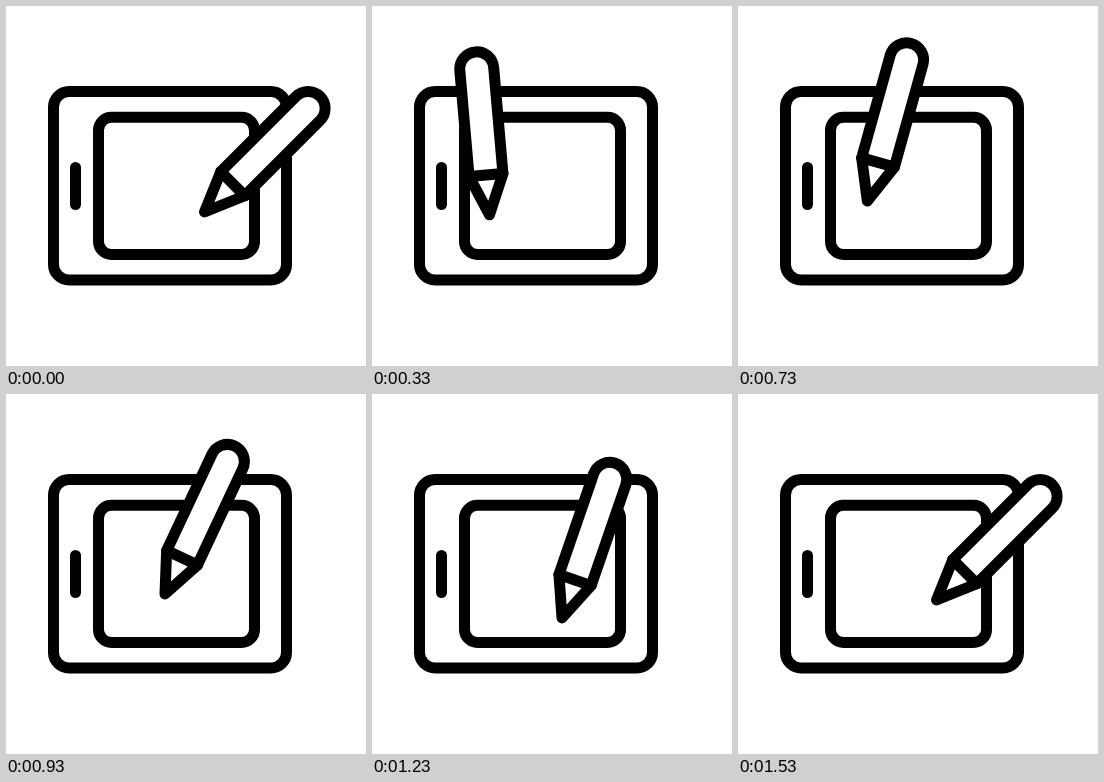
An HTML page for the animation above (1610 ms loop, 360 by 360 pixels).

```html
<!DOCTYPE html>
<html lang="en">
<head>
<meta charset="utf-8">
<title>Drawing tablet</title>
<style>
  html, body { margin: 0; width: 100%; height: 100%; overflow: hidden; background: #fff; }
  svg { display: block; width: 100vw; height: 100vh; }
  g { fill: #fff; stroke: #000; stroke-width: 11; stroke-linecap: round; stroke-linejoin: round; }
</style>
</head>
<body>
<svg viewBox="0 0 360 360">
  <g>
    <rect x="47.5" y="85.6" width="233" height="188.4" rx="15.5"/>
    <rect x="92.5" y="111.3" width="156" height="137.2" rx="13"/>
    <path d="M69.5 161.5V198.5"/>
  </g>
  <g id="pen">
    <path d="M0 0L-17-40V-146.5A17 17 0 0 1 17-146.5V-40Z"/>
    <path d="M-17-40H17"/>
  </g>
</svg>
<script>
  const LOOP = 1610, FPS = 30, LAST = 46;
  const rest = { x: 198.5, y: 206, tilt: 45 };
  // The pen sweeps left, lifts, and strokes back to its rest
  const poses = [
    { step: 0, ...rest },
    { step: 5, x: 152.5, y: 211.5, tilt: 17 },
    { step: 10, x: 117.5, y: 208.8, tilt: -5 },
    { step: 17, x: 109.5, y: 195.5, tilt: 5.3 },
    { step: 28, x: 159, y: 200, tilt: 25.2 },
    { step: 37, x: 190, y: 223.9, tilt: 19 },
    { step: LAST, ...rest }
  ];
  const pen = document.getElementById('pen');

  // Slope between the neighbours of pose i, one-sided at the ends
  function slope(i, key) {
    const a = poses[Math.max(i - 1, 0)];
    const b = poses[Math.min(i + 1, poses.length - 1)];
    return (b[key] - a[key]) / (b.step - a.step);
  }

  // Smooth cubic through the poses
  function valueAt(step, key) {
    const j = Math.max(1, poses.findIndex(p => p.step >= step)), i = j - 1;
    const p = poses[i], q = poses[j], h = q.step - p.step;
    const u = (step - p.step) / h, v = 1 - u;
    return p[key] * v * v * (1 + 2 * u) + q[key] * u * u * (1 + 2 * v)
      + h * u * v * (slope(i, key) * v - slope(j, key) * u);
  }

  function draw(time) {
    // Steps start on the nearest 10 ms
    const t = Math.floor(time / 10) * 10 + 5;
    const step = Math.min(LAST, Math.floor(t * FPS / 1000));
    const [x, y, tilt] = ['x', 'y', 'tilt'].map(key => valueAt(step, key));
    pen.setAttribute('transform', `translate(${x} ${y}) rotate(${tilt})`);
  }

  const start = performance.now();
  function tick() {
    draw((performance.now() - start) % LOOP);
    requestAnimationFrame(tick);
  }
  tick();
</script>
</body>
</html>
```
